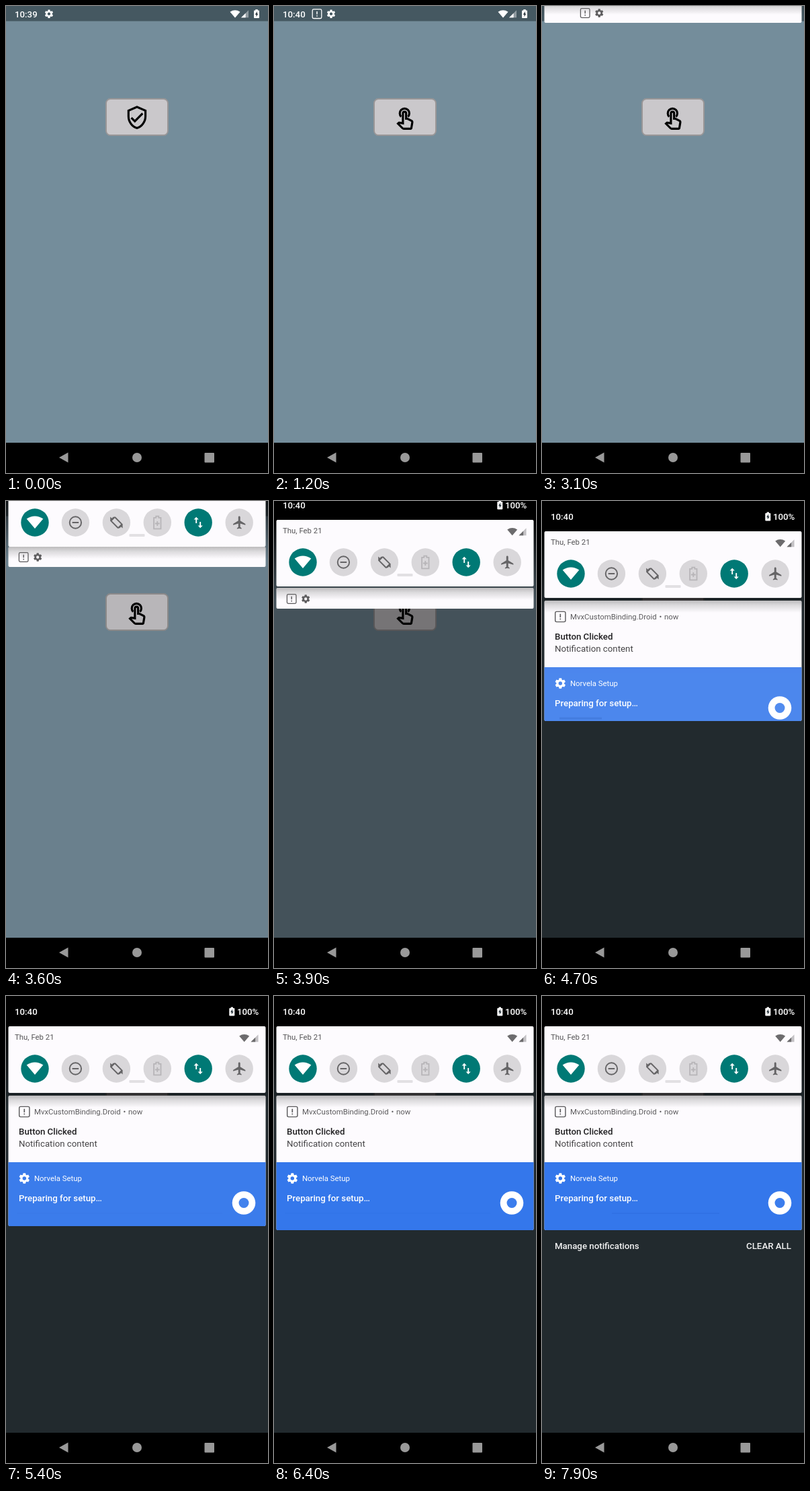
Write an HTML page that moves like this. It is 390x694 px and loops after 8000 ms.

```html
<!DOCTYPE html>
<html lang="en">
<head>
<meta charset="utf-8">
<title>Notification shade</title>
<style>
html, body { margin: 0; width: 100%; height: 100%; overflow: hidden; background: #000; }
svg { display: block; }
#stage { width: 100%; height: 100%; }
text { font: 400 13.27px Roboto, sans-serif; }
.small { font-size: 11.38px; }
.medium { font-weight: 500; }
.line { fill: none; stroke: currentColor; }
.solid { fill: currentColor; }
</style>
</head>
<body>
<svg id="stage" viewBox="0 0 390 694">
  <defs>
    <g id="gear">
      <circle class="line" r="5.5" stroke-width="4"/>
      <g id="teeth"></g>
    </g>
    <g id="alert">
      <rect class="line" x="-6.8" y="-6.8" width="13.6" height="13.6" rx="1.8" stroke-width="1.3"/>
      <path class="line" d="M0-3.8V.8M0 2.3v1.6" stroke-width="1.5"/>
    </g>
    <path id="wifi" class="solid" d="M0 9L-12.3-5.4Q0-13.4 12.3-5.4Z"/>
    <g id="signal" class="solid">
      <path d="M0 11H11V0Z" opacity=".4"/>
      <path d="M0 11H6.6V4.4Z"/>
    </g>
    <g id="battery">
      <path class="solid" d="M-1.7-6.5h3.4v1.4H3q1 0 1 1V5.5q0 1-1 1H-3q-1 0-1-1V-4.1q0-1 1-1h1.3z"/>
      <path d="M.8-3.4L-2.2 1.3H-.5V4.6L2.3 0H.8z" fill="#26323a"/>
    </g>
    <linearGradient id="fade" x2="0" y2="1">
      <stop stop-color="#000"/>
      <stop offset="1" stop-color="#000" stop-opacity="0"/>
    </linearGradient>
    <linearGradient id="shade" x2="0" y2="1">
      <stop stop-color="#777" stop-opacity=".48"/>
      <stop offset=".4" stop-color="#777" stop-opacity=".24"/>
      <stop offset="1" stop-color="#777" stop-opacity="0"/>
    </linearGradient>
    <clipPath id="listClip"><rect id="listBox" x="3.5" width="383" rx="2"/></clipPath>
  </defs>

  <!-- app -->
  <rect width="390" height="650" fill="#748d9b"/>
  <rect width="390" height="22.5" fill="#455861"/>
  <g color="#fff">
    <text id="clock" class="medium" x="13" y="16.5" fill="#fff"></text>
    <use id="newIcon" href="#alert"/>
    <use id="oldIcon" href="#gear"/>
    <use href="#wifi" transform="translate(341 12)scale(.61)"/>
    <use href="#signal" x="350" y="6.3"/>
    <use href="#battery" x="373" y="11.5"/>
  </g>
  <rect x="149" y="138" width="92" height="54" rx="6.5" fill="#cac8cb" stroke="#999697" stroke-width="2"/>
  <rect id="press" x="150" y="139" width="90" height="52" rx="6" fill="#000"/>
  <path id="shield" transform="translate(176 146.6)scale(1.58)" fill-rule="evenodd" d="M12 1L3 5v6c0 5.55 3.84 10.74 9 12 5.16-1.26 9-6.45 9-12V5zm7 10c0 4.52-2.98 8.69-7 9.93-4.02-1.23-7-5.4-7-9.93V6.3l7-3.11 7 3.11zM7.41 11.59L6 13l4 4 8-8-1.41-1.42L10 14.17z"/>
  <g id="touch" transform="translate(176 149.2)scale(1.58)" fill="none" stroke="#000" stroke-width="2">
    <path d="M8.4 9.7A4.5 4.5 0 1 1 14.8 9.7"/>
    <path d="M10.07 15.9V6.5a1.5 1.5 0 0 1 3 0v5h1l3.9 1.9a1.7 1.7 0 0 1 .9 1.9l-.8 4.7a1 1 0 0 1-1 1h-6.3q-.6 0-1-.4l-4.4-4.4.8-.8q.2-.2.6-.1z"/>
  </g>

  <!-- pulled-down shade; the panel's own y = 0 is its bottom edge -->
  <g id="overlay">
    <rect id="scrim" width="390" height="650"/>
    <g id="backdrop">
      <rect y="-249" width="390" height="150"/>
      <rect y="-99" width="390" height="120" fill="url(#fade)"/>
    </g>

    <g clip-path="url(#listClip)">
      <rect x="3" width="384" height="649" fill="#fdfbfe"/>
      <g id="cards">
        <use href="#alert" transform="translate(27.3 172)scale(1.12)" color="#5c5b5d"/>
        <g class="small" fill="#5c5b5d">
          <text class="small" x="42" y="176">MvxCustomBinding.Droid</text>
          <text class="small" x="174.5" y="176">•</text>
          <text class="small" x="182" y="176">now</text>
        </g>
        <text class="medium" x="19" y="206" fill="#212022">Button Clicked</text>
        <text x="19" y="224.3" fill="#464547">Notification content</text>
        <g id="setup">
          <rect x="3" y="247" width="384" height="110" fill="#3477eb"/>
          <use href="#gear" transform="translate(27.3 271)scale(.78)" color="#fff"/>
          <text class="small" x="42" y="275.2" fill="#fff">Norvela Setup</text>
          <text class="medium" x="19" y="305" fill="#fff">Preparing for setup…</text>
          <circle cx="354" cy="307.5" r="17.3" fill="#fff"/>
          <circle cx="354" cy="307.5" r="7.5" fill="#3b7ded"/>
          <rect id="bar" fill="#2a69da"/>
        </g>
      </g>
      <g id="shelf" color="#5c5b5d">
        <use href="#alert" x="26.2"/>
        <use href="#gear" transform="translate(47.2)scale(.62)"/>
      </g>
      <rect id="listShade" x="3" width="384" height="18" fill="url(#shade)"/>
    </g>

    <g id="panel">
      <rect x="3.5" y="-99" width="383" height="99" rx="2" fill="#fdfbfe"/>
      <g color="#fff" fill="#fff">
        <text class="medium" x="13" y="-116.2">10:40</text>
        <use href="#battery" x="336.3" y="-121"/>
        <text class="medium" x="344" y="-116.2">100%</text>
      </g>
      <text class="small" x="13" y="-78.7" fill="#565557">Thu, Feb 21</text>
      <g color="#6c6b6d">
        <use href="#wifi" transform="translate(354.7 -81.3)scale(.61)"/>
        <use href="#signal" x="364.5" y="-86.7"/>
      </g>
      <rect x="183.5" y="-19" width="23" height="4" rx="1" fill="#e2e0e3"/>
      <g id="tiles"></g>
    </g>

    <g id="footer" fill="#fff">
      <text class="medium" x="19" y="375.5">Manage notifications</text>
      <text class="medium" x="371" y="375.5" text-anchor="end">CLEAR ALL</text>
    </g>
  </g>

  <!-- navigation bar -->
  <rect y="649" width="390" height="45"/>
  <g fill="#999">
    <path d="M79 671L92.5 663.5V678.5Z"/>
    <circle cx="195" cy="671" r="7"/>
    <rect x="295.5" y="664" width="14.5" height="14.5" rx="1"/>
  </g>
</svg>

<script>
const LOOP = 8000, STEP = 100;
const $ = id => document.getElementById(id);
const set = (id, attrs) => {
  for (const key in attrs) $(id).setAttribute(key, attrs[key]);
};
const move = (x, y, scale = 1) => `translate(${x} ${y})scale(${scale})`;

$('teeth').innerHTML = [0, 60, 120, 180, 240, 300].map(a =>
  `<path class="solid" d="M-2.3-10h4.6l.8 4h-6.2z" transform="rotate(${a})"/>`).join('');

// Quick settings tiles: centre x, disc colour, icon colour, icon
const TILES = [
  [43, '#007975', '#fff', '<use href="#wifi"/>'],
  [103.4, '#d9d7da', '#656466',
    '<circle class="line" r="8.7" stroke-width="1.9"/><path class="line" d="M-4.8 0H4.8" stroke-width="2"/>'],
  [164.4, '#d9d7da', '#656466',
    '<rect class="line" x="-4" y="-7.6" width="8" height="15.2" rx="1" stroke-width="1.9" transform="rotate(-45)"/>' +
    '<path class="solid" d="M-9.2-1.8V-8.6L-6.8-6.2-4.6-8.4-3.2-7-8-2.2zM9.2 1.8V8.6L6.8 6.2 4.6 8.4 3.2 7 8 2.2z"/>'],
  [225.3, '#d9d7da', '#b7b5b8',
    '<path class="line" d="M-2-9.3h4v2.2h3.2V9.3H-5.2V-7.1H-2zM0-2V5M-3.4 1.5H3.4" stroke-width="1.8"/>'],
  [286.2, '#007975', '#fff',
    '<path class="line" d="M-3 1V-6M3-1V6" stroke-width="1.9"/><path class="solid" d="M-6.6-4.4L-3-8.3.6-4.4zM-.6 4.4L3 8.3 6.6 4.4z"/>'],
  [347.2, '#d9d7da', '#656466',
    '<path class="solid" transform="translate(-11 -11.5)scale(.96)" d="M21 16v-2l-8-5V3.5c0-.83-.67-1.5-1.5-1.5S10 2.67 10 3.5V9l-8 5v2l8-2.5V19l-2 1.5V22l3.5-1 3.5 1v-1.5L13 19v-5.5z"/>'],
];
$('tiles').innerHTML = TILES.map(([x, disc, ink, icon]) =>
  `<g transform="translate(${x} -36)" color="${ink}"><circle r="20.7" fill="${disc}"/>${icon}</g>`).join('');

// Motion tables: [time, value]
const PANEL = [[3100, -5], [3200, 1], [3400, 30], [3600, 68], [3900, 127], [4000, 134], [4200, 142], [4300, 144]];
const LIST_END = [[3100, 25], [3200, 31], [3400, 60], [3600, 98], [3900, 160], [4000, 183], [4200, 248],
  [4400, 294], [4600, 320], [4700, 327], [4800, 333], [5100, 341], [5300, 341], [5400, 342], [6000, 342], [6400, 348]];
const SCRIM = [[3200, 0], [3400, .03], [3600, .09], [3900, .42], [4100, .58], [4400, .7]];
const SHELF_X = [[3100, 38], [3300, 20], [3500, 3], [3600, 0]];
const SHELF_ALPHA = [[3900, 1], [4200, 0]];
const CARD_ALPHA = [[3900, 0], [4000, .3], [4300, 1]];
const SETUP_ALPHA = [[4100, 0], [4300, .5], [4700, .88], [5100, .96], [6000, .96], [6400, 1]];
const FOOTER = [[6500, 0], [7400, .94]];
const PRESS = [[400, 0], [500, .1], [700, .14], [1100, 0]];
const ICON_IN = [[600, 0], [1200, 1]];

function at(table, t) {
  if (t <= table[0][0]) return table[0][1];
  for (let i = 1; i < table.length; i++) {
    const [t0, a] = table[i - 1], [t1, b] = table[i];
    if (t <= t1) return a + (b - a) * (t - t0) / (t1 - t0);
  }
  return table[table.length - 1][1];
}

function drawApp(t) {
  const shift = at(ICON_IN, t);
  $('clock').textContent = t < 700 ? '10:39' : '10:40';
  set('newIcon', { transform: move(64, 11.7), opacity: shift });
  set('oldIcon', { transform: move(64 + 21 * shift, 11.7, .62) });
  set('press', { opacity: at(PRESS, t) });
  set('shield', { visibility: t < 600 ? 'visible' : 'hidden' });
  set('touch', { visibility: t < 600 ? 'hidden' : 'visible' });
}

function drawBar(t) {
  if (t < 4900) {
    const x = 26 + Math.max(0, t - 4700) * .15;
    set('bar', { x, y: 321.5, width: 63, height: 3, opacity: .9 });
  } else if (t < 6600) {
    set('bar', { x: 16, y: 322.5, width: 306, height: 1, opacity: .22 });
  } else {
    set('bar', { x: 104, y: 322.5, width: 160, height: 1, opacity: .75 });
  }
}

function drawShade(t) {
  set('overlay', { visibility: t < 3100 ? 'hidden' : 'visible' });
  if (t < 3100) return;
  const bottom = at(PANEL, t), end = at(LIST_END, t);
  const top = bottom + at([[3600, 0], [3900, 2], [4300, 4]], t);
  set('scrim', { opacity: at(SCRIM, t) });
  set('backdrop', { transform: move(0, bottom) });
  set('panel', { transform: move(0, bottom) });
  set('listBox', { y: top, height: end - top });
  set('listShade', { y: top });
  set('cards', { transform: move(0, bottom - 144), opacity: at(CARD_ALPHA, t) });
  set('setup', { opacity: at(SETUP_ALPHA, t) });
  set('shelf', { transform: move(at(SHELF_X, t), end - 14.5), opacity: at(SHELF_ALPHA, t) });
  set('footer', { opacity: at(FOOTER, t) });
  drawBar(t);
}

const start = performance.now();
function frame() {
  const elapsed = (performance.now() - start) % LOOP;
  const t = Math.floor(elapsed / STEP) * STEP;
  drawApp(t);
  drawShade(t);
  requestAnimationFrame(frame);
}
frame();
</script>
</body>
</html>
```
